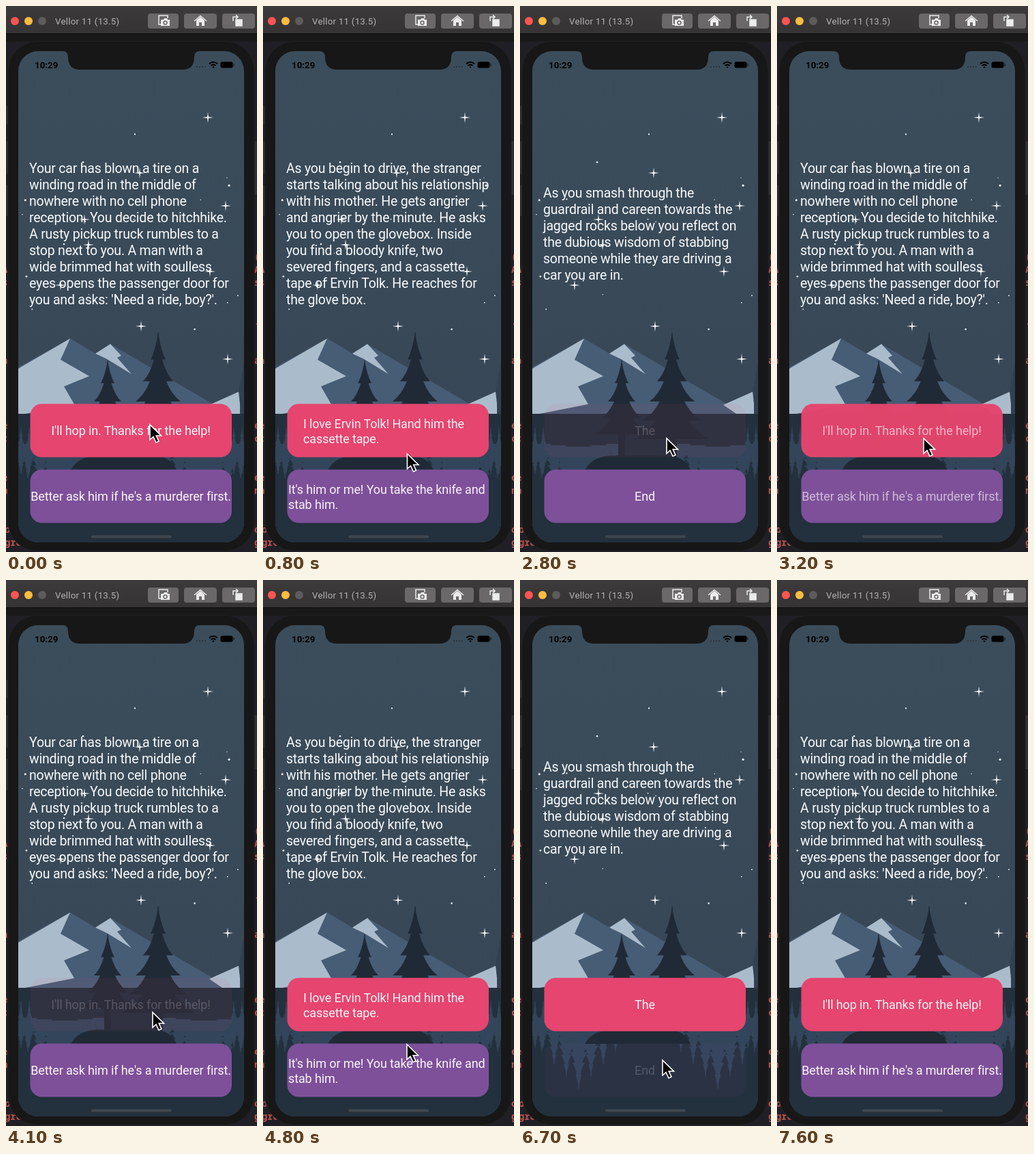
An HTML page for the animation above (7700 ms loop, 368x798 px).

```html
<!DOCTYPE html>
<html lang="en">
<head>
<meta charset="utf-8">
<style>
html, body { margin: 0; width: 100%; height: 100%; overflow: hidden; background: #211f26; }
svg { display: block; width: 368px; height: 798px; font-family: Roboto, "Liberation Sans", sans-serif; }
#story { font-size: 19.5px; letter-spacing: -.21px; fill: #f7f9fb; }
.title { font-size: 18px; letter-spacing: -.13px; fill: #fbf4f8; }
#code { font: 700 14px "Noto Sans Mono", monospace; fill: #b9534c; }
</style>
</head>
<body>
<svg viewBox="0 0 368 798">
  <defs>
    <linearGradient id="sky" x2="0" y2="1">
      <stop offset="0" stop-color="#3b4d5b"/><stop offset=".6" stop-color="#384857"/><stop offset="1" stop-color="#364657"/>
    </linearGradient>
    <linearGradient id="bar" x2="0" y2="1">
      <stop offset="0" stop-color="#3c3a3b"/><stop offset="1" stop-color="#353334"/>
    </linearGradient>
    <clipPath id="screen"><rect x="18" y="66" width="331" height="718" rx="29"/></clipPath>
  </defs>

  <!-- editor behind the simulator -->
  <rect width="368" height="798" fill="#211f26"/>
  <g id="code"></g>
  <path d="M0 40H368V52H0Z" fill="#191919"/>
  <path d="M0 146H4V173H0ZM0 198H4V245H0ZM0 262H4V307H0ZM364 198H368V276H364Z" fill="#302f34"/>

  <!-- window bar -->
  <path d="M0 0H368V40H0Z" fill="url(#bar)"/>
  <path d="M0 40.500H368" stroke="#0c0c0c"/>
  <circle cx="13" cy="22" r="6" fill="#fc5551"/>
  <circle cx="33" cy="22" r="6" fill="#fcbc40"/>
  <circle cx="53" cy="22" r="6" fill="#5d5b5c"/>
  <text x="72" y="27" font-size="13.300" letter-spacing=".25" fill="#b5b3b4">Vellor 11 (13.5)</text>
  <g fill="#6a6869">
    <rect x="208" y="11" width="45" height="22" rx="4"/>
    <rect x="261" y="11" width="48" height="22" rx="4"/>
    <rect x="317" y="11" width="48" height="22" rx="4"/>
  </g>
  <g fill="#ececec" stroke="#ececec" stroke-width="1.500">
    <path d="M224 25V14H237V18M224 25V27H228" fill="none"/>
    <path d="M227 20H231L232 18H236L237 20H240V29H227Z" stroke="none"/>
    <circle cx="233.500" cy="24.500" r="2.500" stroke="#6a6869"/>
    <path d="M276 22L285 14.500L294 22" fill="none"/>
    <path d="M279 21V29H283V24H287V29H291V21L285 16Z" stroke="none"/>
    <path d="M337 20H346V29H337Z"/>
    <path d="M333 22V16H339M337 13L340 16L337 19" fill="none"/>
  </g>

  <!-- phone -->
  <rect x="3" y="51.500" width="361" height="745" rx="43" fill="#171717" stroke="#222123"/>
  <g clip-path="url(#screen)">
    <path d="M18 66H349V784H18Z" fill="url(#sky)"/>
    <path d="M18 528L94 486L133 509L153 494L302 581L331 598V610H18Z" fill="#475c75"/>
    <g fill="#aabccb">
      <path d="M18 530L94 486L80 517L122 541L85 556L100 582L18 598Z"/>
      <path d="M131 508L153 494L169 511L163 514L184 538L148 516Z"/>
      <path d="M298 583L343 563V598H320Z"/>
    </g>
    <path d="M349 520L341 563L345 600H349Z" fill="#314151"/>
    <path d="M18 596H349V784H18Z" fill="#23303d"/>
    <g id="woods" fill="#33455a"></g>
    <g id="pines" fill="#1f2a36"></g>
    <path d="M95 678Q106 658 135 657H220Q242 660 250 678Z" fill="#1f2a36"/>
    <g id="stars" fill="#f5f8fa"></g>
    <path d="M83 66Q91 66 91 75Q91 93 109 93H258Q276 93 276 75Q276 66 284 66Z" fill="#171717"/>
  </g>
  <text x="42" y="91" font-size="13.300" font-weight="700">10:29</text>
  <path d="M279 89H295" stroke="#2b3640" stroke-width="2" stroke-dasharray="2 2"/>
  <path d="M298 84.500Q304 79.500 310 84.500M300.500 87.200Q304 84.300 307.500 87.200" fill="none" stroke="#000" stroke-width="2"/>
  <circle cx="304" cy="89.500" r="1.300"/>
  <rect x="314.500" y="81.500" width="18" height="9" rx="2.500"/>
  <path d="M334 84V88" stroke="#111"/>
  <rect x="125" y="773.500" width="118" height="4" rx="2" fill="#40474d"/>

  <text id="story"></text>
  <rect id="red" x="35.500" y="581.500" width="295.500" height="78" rx="17" fill="#e5456e"/>
  <rect id="purple" x="35.500" y="677.500" width="295.500" height="78" rx="17" fill="#7d5099"/>
  <text id="redTitle" class="title"></text>
  <text id="purpleTitle" class="title"></text>
  <path id="cursor" d="M0 0V22L5 17.500L9 26L13 24.200L9.200 16H16.500Z" stroke="#fff" stroke-width="1.600"/>
</svg>
<script>
const $ = id => document.getElementById(id);
const LOOP = 7700, STEP = 100;
const DIM = .07, FADE = 400, TITLE_FADE = 600;
const GLIDE_DELAY = 220, GLIDE = 700, CURSOR_GONE = 7200;

const scenes = [
  {
    top: 244,
    story: ["Your car has blown a tire on a", "winding road in the middle of", "nowhere with no cell phone",
      "reception. You decide to hitchhike.", "A rusty pickup truck rumbles to a", "stop next to you. A man with a",
      "wide brimmed hat with soulless", "eyes opens the passenger door for", "you and asks: 'Need a ride, boy?'."],
    red: ["I'll hop in. Thanks for the help!"],
    purple: ["Better ask him if he's a murderer first."]
  },
  {
    top: 244,
    story: ["As you begin to drive, the stranger", "starts talking about his relationship", "with his mother. He gets angrier",
      "and angrier by the minute. He asks", "you to open the glovebox. Inside", "you find a bloody knife, two",
      "severed fingers, and a cassette", "tape of Ervin Tolk. He reaches for", "the glove box."],
    red: ["I love Ervin Tolk! Hand him the", "cassette tape."],
    purple: ["It's him or me! You take the knife and", "stab him."]
  },
  {
    top: 280,
    story: ["As you smash through the", "guardrail and careen towards the", "jagged rocks below you reflect on",
      "the dubious wisdom of stabbing", "someone while they are driving a", "car you are in."],
    red: ["The"],
    purple: ["End"]
  }
];

// Every release moves on to the next scene; the button stays dim while pressed.
const taps = [
  { press: 100, release: 250, button: "red", x: 211, y: 612 },
  { press: 1450, release: 1600, button: "purple", x: 212, y: 705 },
  { press: 2650, release: 2840, button: "red", x: 215, y: 632 },
  { press: 4050, release: 4150, button: "red", x: 215, y: 632 },
  { press: 5200, release: 5400, button: "purple", x: 209, y: 702 },
  { press: 6700, release: 7000, button: "purple", x: 209, y: 702 }
];

const mix = (a, b, p) => a + (b - a) * p;
const ease = p => { p = Math.min(1, Math.max(0, p)); return p * p * (3 - 2 * p); };

function setLines(id, lines, x, y, gap, anchor = "start") {
  $(id).setAttribute("text-anchor", anchor);
  $(id).innerHTML = lines.map((s, i) => `<tspan x="${x}" y="${y + i * gap}">${s}</tspan>`).join("");
}

function setTitle(id, lines, left, y) {
  if (lines.length > 1) setLines(id, lines, left, y - 10.5, 22);
  else setLines(id, lines, 183, y, 0, "middle");
}

let shown;
function showScene(scene) {
  if (scene === shown) return;
  shown = scene;
  setLines("story", scene.story, 34, scene.top, 23.95);
  setTitle("redTitle", scene.red, 59, 627);
  setTitle("purpleTitle", scene.purple, 37, 723);
}

function moveCursor(t, from, to) {
  const p = ease((t - from.release - GLIDE_DELAY) / GLIDE);
  $("cursor").setAttribute("transform", `translate(${mix(from.x, to.x, p)} ${mix(from.y, to.y, p)})`);
  $("cursor").setAttribute("visibility", t < CURSOR_GONE ? "visible" : "hidden");
}

function draw() {
  const t = Math.floor(performance.now() % LOOP / STEP) * STEP;
  const done = taps.filter(k => k.release <= t).length;
  const last = taps[done - 1], next = taps[done];
  showScene(scenes[done % scenes.length]);
  for (const b of ["red", "purple"]) {
    const held = next && next.press <= t && next.button === b;
    const since = last ? t - last.release : LOOP;
    const tapped = last && last.button === b;
    $(b).setAttribute("opacity", held ? DIM : tapped ? mix(DIM, 1, ease(since / FADE)) : 1);
    $(b + "Title").setAttribute("opacity", held ? .2 : ease(since / TITLE_FADE));
  }
  moveCursor(t, last || next, next || last);
  requestAnimationFrame(draw);
}

// Conifer with flared tiers, as two mirrored halves; a negative height hangs it upside down.
function pine(x, y, w, h, tiers) {
  let d = "M-.5 0L0 0", neck = 0, top = 0;
  for (let i = 1; i <= tiers; i++) {
    const half = w / 2 * i / tiers, foot = h * (i / tiers) ** .85;
    d += `Q${mix(neck, half, .35)} ${mix(top, foot, .65)} ${half} ${foot}`;
    neck = half * .55;
    top = foot;
    d += `L${neck} ${top}`;
  }
  d += `H-.5Z`;
  return [1, -1].map(s => `<path d="${d}" transform="translate(${x} ${y}) scale(${s} 1)"/>`).join("");
}

function drawWoods() {
  let woods = "";
  for (const center of [86, 290])
    for (let k = -3; k <= 3; k++) {
      const n = Math.abs(k), x = center + k * 18;
      woods += pine(x, 744 - 18 * n, 56 - 9 * n, 16 * n - 98, 6);
    }
  for (const edge of [22, 34, 334, 346]) woods += pine(edge, 616, 18, 44, 4) + pine(edge, 684, 16, -26, 4);
  $("woods").innerHTML = woods;
  $("pines").innerHTML = pine(149, 518, 80, 108, 4) + pine(223, 477, 110, 156, 5) +
    '<path d="M144 600H154V665H144ZM216 600H230V665H216Z"/>';
}

function drawStars() {
  let seed = 11;
  const random = () => (seed = seed * 16807 % 2147483647) / 2147483647;
  const sparks = [[296, 163], [196, 244], [322, 292], [115, 312], [121, 349], [80, 408], [299, 388], [198, 468], [325, 516]];
  let stars = sparks.map(([x, y]) => `<path d="M${x} ${y - 8}l.9 7.100 7.100.9-7.100.9-.9 7.100-.9-7.100-7.100-.9 7.100-.9z"/>`).join("");
  for (let i = 0; i < 19; i++)
    stars += `<circle cx="${mix(24, 340, random())}" cy="${mix(155, 490, random())}" r="${mix(.7, 1.8, random() ** 2)}"/>`;
  $("stars").innerHTML = stars;
}

function drawCode() {
  const lines = "(,A,s,,,.,,,a,,,,,e,c,,,e,n,,,o(,gro".split(",");
  $("code").innerHTML = lines.map((s, i) => {
    const y = 371 + 19 * i;
    return `<text x="${s.length > 1 ? -2 : -6}" y="${y}">${s}</text><text x="364" y="${y}">${s}</text>`;
  }).join("");
}

drawCode();
drawWoods();
drawStars();
draw();
</script>
</body>
</html>
```
